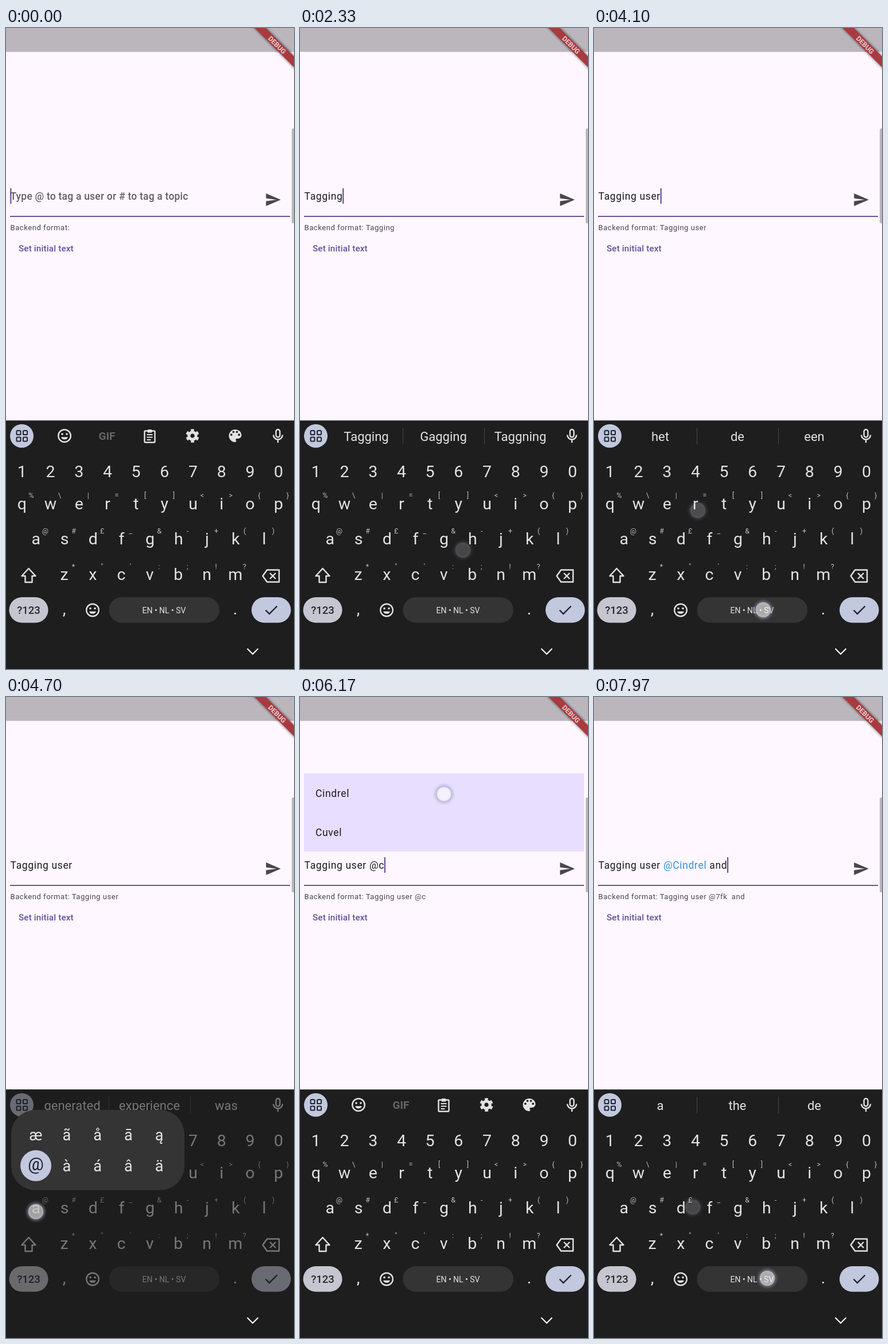
An HTML page that plays this animation: 502x1116 px, repeating every 8 s.

```html
<!DOCTYPE html>
<html lang="en">
<head>
<meta charset="utf-8">
<title>Tagging text field</title>
<style>
  html, body { margin: 0; width: 100%; height: 100%; overflow: hidden; background: #fef7ff; }
  svg { display: block; width: 100vw; height: 100vh; font-family: Roboto, sans-serif; }
  text { white-space: pre; }
  .body { font-size: 17.5px; letter-spacing: .65px; fill: #1d1b20; }
  .small { font-size: 13.07px; letter-spacing: .53px; fill: #49454f; }
  .key { font-size: 28.5px; }
  .hint { font-size: 12.5px; fill: #bdbdbd; }
  .word { font-size: 22px; }
  .mid { text-anchor: middle; }
  .line { fill: none; stroke: #e3e3e3; stroke-width: 2.4; }
  .dark { stroke: #1f2230; }
</style>
</head>
<body>
<svg viewBox="0 0 502 1116" xmlns="http://www.w3.org/2000/svg">
  <defs>
    <filter id="soft" x="-50%" y="-50%" width="200%" height="200%"><feGaussianBlur stdDeviation="2"/></filter>
    <g id="smile">
      <circle class="line" r="10.8"/>
      <g fill="#e3e3e3"><circle cx="-4" cy="-3" r="1.8"/><circle cx="4" cy="-3" r="1.8"/><path d="M-6 2.2H6A6.4 6.4 0 0 1-6 2.2z"/></g>
    </g>
  </defs>

  <rect width="502" height="1116" fill="#fef7ff"/>
  <rect width="502" height="41.6" fill="#bbb6bc"/>
  <g transform="translate(502 0) rotate(45)">
    <rect x="-75" y="34" width="150" height="15" fill="#000" opacity=".5" filter="url(#soft)"/>
    <rect x="-75" y="35" width="150" height="13.3" fill="#a93a3f"/>
    <text class="mid" y="46" font-size="12" font-weight="700" fill="#e6d0d3">DEBUG</text>
  </g>
  <rect x="498" y="175" width="8" height="165" rx="2.5" fill="#bbb7bd"/>

  <g id="options">
    <rect x="7" y="133" width="488" height="136" fill="#e8deff"/>
    <text class="body" x="27" y="173.5">Cindrel</text>
    <text class="body" x="27" y="241.8">Cuvel</text>
  </g>
  <text id="placeholder" x="7.5" y="299.2" font-size="17.43" font-weight="500" letter-spacing=".24" fill="#625d66">Type @ to tag a user or # to tag a topic</text>
  <text class="body" x="7.5" y="299.2" xml:space="preserve"><tspan id="before"></tspan><tspan id="mention" fill="#2b93dc"></tspan><tspan id="after"></tspan></text>
  <rect id="caret" y="279" width="2.2" height="27" fill="#6551a0"/>
  <rect x="7" y="327" width="488" height="2" fill="#65559b"/>
  <path transform="translate(450.8 284.4) scale(1.22)" fill="#49454f" d="M2 21 23 12 2 3v7l15 2-15 2z"/>
  <text id="backend" class="small" x="7.5" y="351.6" xml:space="preserve"></text>
  <text x="22" y="389.2" font-size="15.25" font-weight="500" letter-spacing=".14" fill="#62509b">Set initial text</text>

  <rect y="683.3" width="502" height="433" fill="#1e1e1f"/>
  <g fill="#e3e3e3">
    <circle cx="27.5" cy="710.3" r="20.5" fill="#c2c8dd"/>
    <g id="grid" class="line dark" style="stroke-width:2"></g>
    <g class="line" transform="translate(474 710)">
      <rect x="-3.4" y="-11" width="6.8" height="13.5" rx="3.4"/>
      <path d="M-8-1.5a8 8 0 0 0 16 0M0 6.5V12"/>
    </g>
    <g id="toolbar">
      <use href="#smile" x="102" y="710"/>
      <text class="mid" x="176" y="717" font-size="19" font-weight="700" fill="#666">GIF</text>
      <g class="line" transform="translate(250.5 711)">
        <rect x="-9" y="-9.5" width="18" height="20" rx="1.5"/>
        <path d="M-5-3H5M-5 1.5H5M-5 6H2" stroke-width="2"/>
        <rect x="-4" y="-12" width="8" height="5.5" rx="1.5" fill="#e3e3e3" stroke="none"/>
      </g>
      <g class="line" transform="translate(325 710)">
        <circle r="6.2" style="stroke-width:5"/>
        <circle r="9.6" style="stroke-width:4.2" pathLength="12" stroke-dasharray="1.1 .9" transform="rotate(13)"/>
      </g>
      <g transform="translate(399.5 710) scale(1.22) translate(-12 -12)">
        <path d="M12 3a9 9 0 0 0 0 18c.83 0 1.5-.67 1.5-1.5 0-1-.77-1-.77-2 0-.83.67-1.5 1.5-1.5H16c2.76 0 5-2.24 5-5 0-4.42-4.03-8-9-8z"/>
        <g fill="#1e1e1f"><circle cx="6.5" cy="10.5" r="1.5"/><circle cx="9.5" cy="6.5" r="1.5"/><circle cx="14.5" cy="6.5" r="1.5"/><circle cx="17.5" cy="10.5" r="1.5"/></g>
      </g>
    </g>
    <g id="suggestions">
      <path d="M179.5 696v29M321.5 696v29" stroke="#47474a"/>
      <text class="word mid" x="115.5" y="718.5"></text>
      <text class="word mid" x="250" y="718.5"></text>
      <text class="word mid" x="384" y="718.5"></text>
    </g>
    <g id="keys"></g>

    <path class="line" stroke-linejoin="round" d="M39.5 941 27.5 954H33.5V965H45.5V954H51.5z"/>
    <path class="line" stroke-linejoin="round" d="M455 943.5H476V964.5H455L447.5 954zM460 949l10 10m0-10-10 10"/>
    <rect x="5.5" y="991" width="68" height="44.5" rx="22.2" fill="#c6c6d0"/>
    <text class="mid" x="39.5" y="1020" font-size="18.5" font-weight="500" fill="#26262b">?123</text>
    <text class="key mid" x="101.5" y="1021">,</text>
    <use href="#smile" x="151" y="1013.5"/>
    <rect x="179.5" y="991" width="192.5" height="44.5" rx="22.2" fill="#343435"/>
    <text class="mid" x="275.5" y="1018.6" font-size="14">EN • NL • SV</text>
    <text class="key mid" x="399.5" y="1021">.</text>
    <rect x="428" y="991" width="68.5" height="44.5" rx="22.2" fill="#c2c8dd"/>
    <path class="line dark" d="M452.5 1013.5l6.5 6.5 13.5-13.5"/>
  </g>

  <g id="popup">
    <rect y="683.3" width="502" height="433" fill="#1c1c1d" opacity=".54"/>
    <rect x="9" y="719" width="302" height="139.5" rx="42" fill="#343435"/>
    <circle cx="52" cy="816" r="27" fill="#c2c8dd"/>
    <g id="accents" fill="#e3e3e3"></g>
  </g>
  <path class="line" style="stroke:#fff;stroke-width:2" d="M420.5 1080.5l9.5 9.5 9.5-9.5"/>
  <g id="touches"></g>
</svg>

<script>
const LOOP = 8000, FADE = 250, TEXT_X = 7.5;
const $ = id => document.getElementById(id);
const show = (el, on) => el.setAttribute('visibility', on ? 'visible' : 'hidden');
const esc = s => s.replace(/&/g, '&amp;').replace(/</g, '&lt;');
const label = (cls, x, y, s, extra = '') => `<text class="${cls} mid" x="${x}" y="${y}" ${extra}>${esc(s)}</text>`;

// Keyboard rows: characters, corner hints, first key x, baseline, hint baseline
const PITCH = 49.7;
const rows = [
  ['1234567890', '', 27.8, 781.5, 0],
  ['qwertyuiop', '%\\|=[]<>{}', 27.8, 837.5, 818],
  ['asdfghjkl', '@#£_&-+()', 52.3, 898.5, 879.5],
  ['zxcvbnm', '*"\':;!?', 101.5, 960.5, 941.5]
];
$('keys').innerHTML = rows.map(([chars, hints, x0, y, hintY]) =>
  [...chars].map((c, i) => label('key', x0 + i * PITCH, y, c)).join('') +
  [...hints].map((c, i) => label('hint', x0 + i * PITCH + 16, hintY, c)).join('')
).join('');

$('grid').innerHTML = [0, 1, 2, 3].map(i =>
  `<rect x="${18.5 + i % 2 * 11.5}" y="${701 + (i >> 1) * 11.5}" width="7" height="7" rx="1.6"/>`).join('');

$('accents').innerHTML = ['æãåāą', '@àáâä'].map((row, r) => [...row].map((c, i) =>
  label('', 52 + i * 53.8, (c === '@' ? 824 : 772 + r * 53.5), c,
    `font-size="${c === '@' ? 31 : 27}"` + (c === '@' ? ' fill="#1f2230"' : ''))).join('')).join('');

// Typing script
const typed = 'Tagging user @c', tail = ' and';
const typedAt = [280, 480, 680, 870, 1320, 1720, 2160, 3060, 3520, 3660, 3800, 3940, 4130, 4900, 5680];
const tailAt = [6250, 7300, 7540, 7800];
const popupAt = 4620, holdAt = 4330;
const [atSignAt, listAt] = typedAt.slice(-2), pickAt = tailAt[0];
const changes = [0, ...typedAt, ...tailAt];

const words = [
  [0, ''],
  [typedAt[0], 'Tagg Tagga Taggar'],
  [typedAt[4], 'Tagging Gagging Taggning'],
  [typedAt[7], 'het de een'],
  [typedAt[12], 'generated experience was'],
  [atSignAt, ''],
  [tailAt[1], 'a the de']
];

// Finger positions, one per change
const spots = [
  [229, 838], [56, 900], [252, 908], [249, 916], [378, 840], [352, 962], [284, 909], [290, 1013],
  [329, 840], [105, 900], [131, 840], [181, 840], [295, 1013], [52, 896], [205, 962],
  [251, 169], [56, 898], [353, 962], [172, 888]
];
const taps = spots.map(([x, y], i) => {
  const up = changes[i + 1];
  const down = up === atSignAt ? holdAt : up - (up === pickAt ? 140 : 90);
  return { x, y, down, up };
});
taps.push({ x: 302, y: 1012, down: 7900, up: LOOP });

const pen = document.createElement('canvas').getContext('2d');
const textWidth = s => {
  pen.font = '17.5px Roboto, sans-serif';
  return pen.measureText(s).width + s.length * .65;
};
const countUntil = (times, t) => times.filter(at => at <= t).length;

function touch({ x, y, down, up }, t) {
  if (t < down || t > up + FADE) return '';
  const alpha = t < up ? 1 : 1 - (t - up) / FADE;
  return `<g transform="translate(${x} ${y})" opacity="${alpha}">
    <circle r="14" fill="none" stroke="#9a9ab8" stroke-width="4" opacity=".6" filter="url(#soft)"/>
    <circle r="13" fill="#fff" fill-opacity=".58" stroke="#a9a9c4" stroke-opacity=".5" stroke-width="1.5"/></g>`;
}

function render(t) {
  const picked = t >= pickAt;
  const before = picked ? 'Tagging user ' : typed.slice(0, countUntil(typedAt, t));
  const mention = picked ? '@Cindrel' : '';
  const after = tail.slice(0, countUntil(tailAt, t));
  $('before').textContent = before;
  $('mention').textContent = mention;
  $('after').textContent = after;
  $('backend').textContent = 'Backend format: ' + before + (picked ? '@7fk ' : '') + after;
  show($('placeholder'), !before);

  const lastChange = changes[countUntil(changes, t) - 1];
  $('caret').setAttribute('x', TEXT_X - .3 + textWidth(before + mention + after));
  show($('caret'), (t - lastChange) % 1000 < 500);

  const line = words[countUntil(words.map(w => w[0]), t) - 1][1];
  show($('toolbar'), !line);
  show($('suggestions'), line);
  const parts = line.split(' ');
  $('suggestions').querySelectorAll('text').forEach((el, i) => el.textContent = parts[i] || '');

  show($('options'), t >= listAt && t < pickAt);
  show($('popup'), t >= popupAt && t < atSignAt);
  $('touches').innerHTML = taps.map(tap => touch(tap, t)).join('');
}

const start = performance.now();
function tick() {
  render((performance.now() - start) % LOOP);
  requestAnimationFrame(tick);
}
tick();
</script>
</body>
</html>
```
